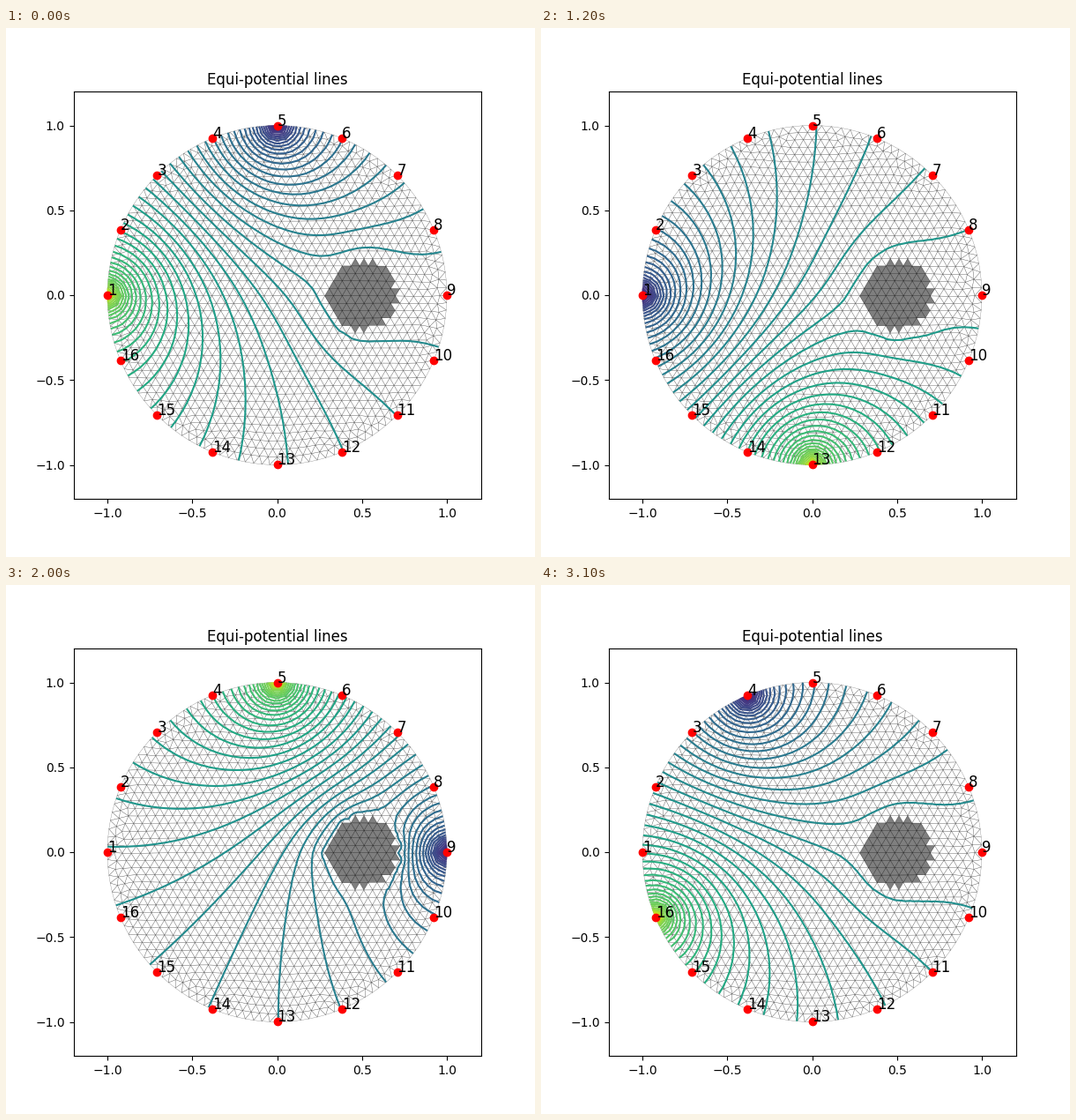
A matplotlib script that plays this animation: 600 by 600 pixels, repeating every 3200 ms.

```python
import numpy as np
import matplotlib.pyplot as plt
from matplotlib.animation import ArtistAnimation
from matplotlib.tri import Triangulation

N_EL = 16          # electrodes on the unit circle
SPAN = 4           # source-to-sink offset in electrodes
H = 0.05           # mesh edge length
GAP = 0.001 * H
LEVELS = 64


def outside(p):
    """Signed distance to the unit circle."""
    return np.hypot(p[:, 0], p[:, 1]) - 1


def start_points(fixed):
    x, y = np.meshgrid(np.arange(-1, 1, H),
                       np.arange(-1, 1, H * np.sqrt(3) / 2), indexing="ij")
    x[:, 1::2] += H / 2
    p = np.column_stack([x.ravel(), y.ravel()])
    p = p[outside(p) < GAP]
    near = np.linalg.norm(p[:, None] - fixed[None], axis=2).min(axis=1)
    return np.vstack([fixed, p[near > GAP]])


def triangulate(p):
    tri = Triangulation(p[:, 0], p[:, 1]).triangles
    tri = tri[outside(p[tri].mean(axis=1)) < -GAP]
    bars = np.vstack([tri[:, [0, 1]], tri[:, [1, 2]], tri[:, [2, 0]]])
    return tri, np.unique(np.sort(bars, axis=1), axis=0)


def build_mesh(fixed, step=0.2, tol=0.001, stretch=1.2, thin_every=30):
    """Relax a triangular grid inside the circle as a truss of springs."""
    p, last = start_points(fixed), None
    for i in range(500):
        if last is None or np.linalg.norm(p - last, axis=1).max() > 0.1 * H:
            last = p.copy()
            bars = triangulate(p)[1]
        vec = p[bars[:, 0]] - p[bars[:, 1]]
        size = np.linalg.norm(vec, axis=1)
        rest = stretch * np.sqrt(np.mean(size ** 2))
        short = rest > 2 * size
        if i % thin_every == 0 and short.any():
            drop = np.unique(bars[short])
            p = np.delete(p, drop[drop >= N_EL], axis=0)
            last = None
            continue
        pull = vec * (np.maximum(rest - size, 0) / size)[:, None]
        force = np.zeros_like(p)
        np.add.at(force, bars[:, 0], pull)
        np.add.at(force, bars[:, 1], -pull)
        force[:N_EL] = 0
        p = p + step * force
        d = outside(p)
        p[d > 0] /= (1 + d[d > 0])[:, None]
        move = np.linalg.norm(step * force[d < -GAP], axis=1).max()
        if move < tol * H:
            break
    return p, triangulate(p)[0]


def potentials(p, tri, perm):
    """Linear finite elements: one column per driven electrode pair."""
    a, b, c = p[tri[:, 0]], p[tri[:, 1]], p[tri[:, 2]]
    edges = np.stack([c - b, a - c, b - a], axis=1)
    u, v = edges[:, 0], edges[:, 1]
    area = np.abs(u[:, 0] * v[:, 1] - u[:, 1] * v[:, 0]) / 2
    local = edges @ edges.transpose(0, 2, 1) * (perm / (4 * area))[:, None, None]
    k = np.zeros((len(p), len(p)))
    np.add.at(k, (tri[:, :, None], tri[:, None, :]), local)
    k[-1, :] = 0
    k[:, -1] = 0
    k[-1, -1] = 1
    load = np.zeros((len(p), N_EL))
    n = np.arange(N_EL)
    load[n, n] = 1
    load[(n + SPAN) % N_EL, n] = -1
    return np.linalg.solve(k, load)


# electrodes sit a hair inside the rim
angle = 2 * np.pi * np.arange(N_EL) / N_EL
electrodes = np.column_stack([-np.cos(angle), np.sin(angle)]) * (1 - 1e-7)
pts, tri = build_mesh(electrodes)
x, y = pts.T

mid = pts[tri].mean(axis=1)
perm = np.where(np.hypot(mid[:, 0] - 0.5, mid[:, 1]) < 0.2, 100.0, 1.0)
fields = potentials(pts, tri, perm)

fig, ax = plt.subplots(figsize=(6, 6), dpi=100)
ax.tripcolor(x, y, tri, perm, edgecolors="k", shading="flat", alpha=0.5,
             cmap="Greys")
scans = []
for f in fields.T:
    levels = np.linspace(f.min(), f.max(), LEVELS)
    scans.append([ax.tricontour(x, y, tri, f, levels, cmap="viridis")])

ax.plot(electrodes[:, 0], electrodes[:, 1], "ro")
for i, (ex, ey) in enumerate(electrodes):
    ax.text(ex, ey, str(i + 1), size=12)
ax.set_title("Equi-potential lines")
ax.set_aspect("equal")
ax.set_xlim(-1.2, 1.2)
ax.set_ylim(-1.2, 1.2)

# two full turns of the electrode pair per loop
anim = ArtistAnimation(fig, scans * 2, interval=100, repeat=True)
plt.show()
```
